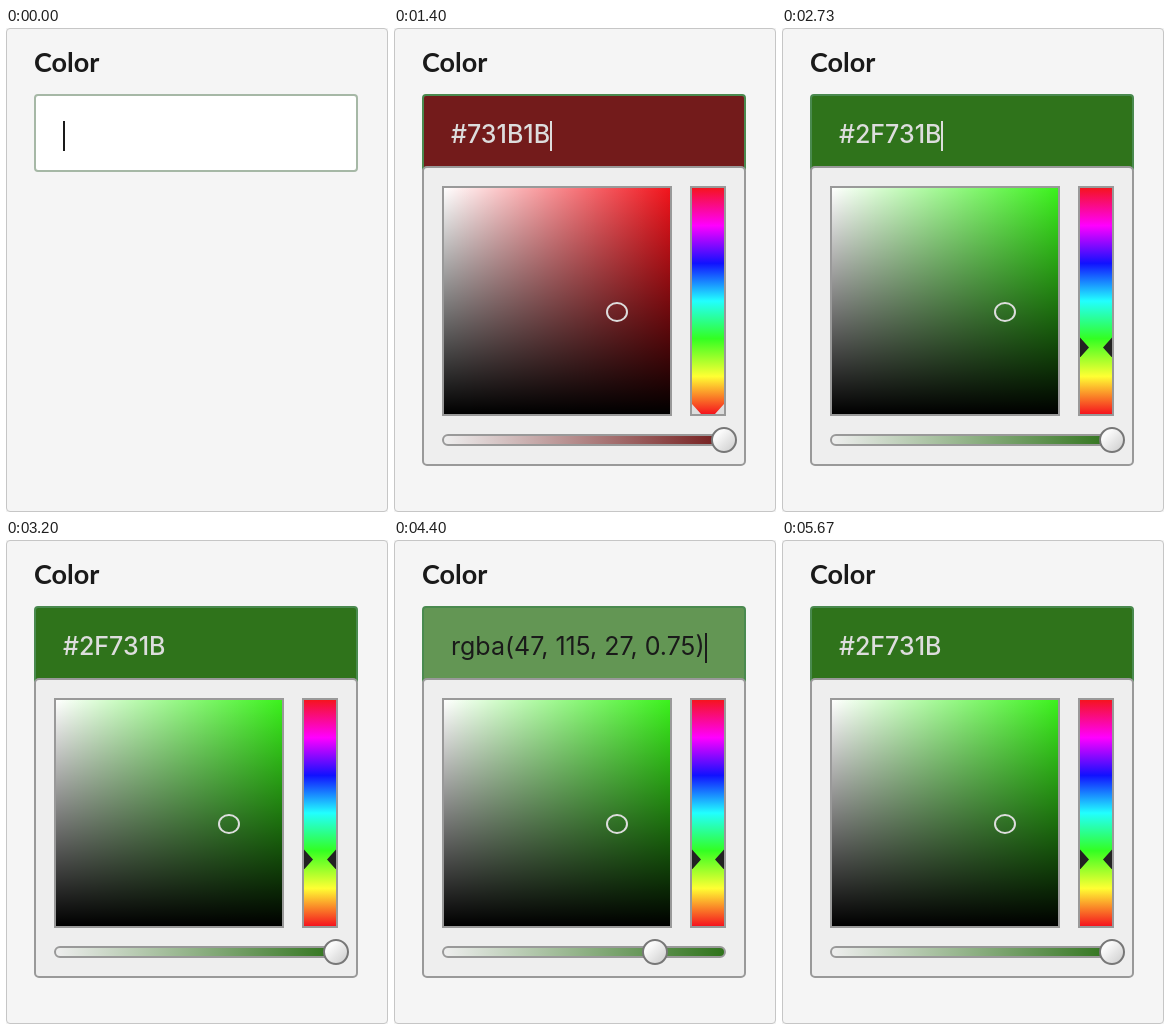
Recreate the animation shown at these times as an HTML page. Size 382 by 484 pixels, loop 5.74 s.

```html
<!DOCTYPE html>
<html lang="en">
<head>
<meta charset="utf-8">
<title>Color picker</title>
<style>
html, body { margin: 0; width: 100%; height: 100%; overflow: hidden; background: #f5f5f5; }
* { box-sizing: border-box; }
div { position: absolute; }
#stage { left: 0; top: 0; width: 382px; height: 484px; border: 1px solid #c6c6c6; border-radius: 4px; }
#stage > div { margin: -1px; }
#label { left: 28px; top: 17px; font: 700 27px/34px Lato, sans-serif; color: #1a1a1a; }
#field { left: 28px; top: 66px; width: 324px; height: 78px; border: 2px solid; border-radius: 4px; }
#value { left: 27px; top: 18px; width: 269px; height: 40px; overflow: hidden; white-space: pre; font: 400 25px/40px Inter, sans-serif; }
#caret { display: inline-block; width: 2px; height: 30px; background: currentColor; vertical-align: middle; }
#panel { left: 28px; top: 138px; width: 324px; height: 300px; background: #eee; border: 2px solid #999; border-radius: 5px; }
.box { top: 18px; height: 230px; border: 2px solid #999; overflow: hidden; }
#shade { left: 18px; width: 230px; }
#hue { left: 266px; width: 36px;
  background: linear-gradient(#f5141e, #f0f, #11f, #2ff, #3f2, #ff3, #f5141e); }
#ring { width: 22px; height: 20px; margin: -10px -11px; border: 2px solid; border-radius: 50%; }
#arrows { left: 0; width: 32px; height: 20px; margin-top: -10px;
  clip-path: polygon(0 0, 9px 50%, 0 100%, 100% 100%, 23px 50%, 100% 0, 100% 100%, 0 100%); }
#bar { left: 18px; top: 266px; width: 284px; height: 12px; border: 2px solid #999; border-radius: 6px; }
#knob { top: 259px; width: 26px; height: 26px; margin-left: -13px; border: 2px solid #777; border-radius: 50%;
  background: linear-gradient(135deg, #fafafa 25%, #ccc); }
</style>
</head>
<body>
<div id="stage">
  <div id="label">Color</div>
  <div id="field"><div id="value"><span id="text"></span><span id="caret"></span></div></div>
  <div id="panel">
    <div id="shade" class="box"><div id="ring"></div></div>
    <div id="hue" class="box"><div id="arrows"></div></div>
    <div id="bar"></div>
    <div id="knob"></div>
  </div>
</div>
<script>
const LOOP = 5740, SIZE = 226;
const $ = id => document.getElementById(id);
const clamp = x => Math.min(1, Math.max(0, x));
const ease = (t, a, b) => { const x = clamp((t - a) / (b - a)); return x * x * (3 - 2 * x); };
const css = c => `rgb(${c.join()})`;
const luma = ([r, g, b]) => .299 * r + .587 * g + .114 * b;
const hex = c => '#' + c.map(v => v.toString(16).padStart(2, '0')).join('').toUpperCase();

function hsv(h, s, v) {
  const part = n => {
    const k = (n + h / 60) % 6;
    return Math.round(255 * v * (1 - s * clamp(Math.min(k, 4 - k))));
  };
  return [part(5), part(3), part(1)];
}

const alphaKeys = [[3200, 1], [3670, .72], [4020, .52], [4400, .75], [4900, 1]];
function alphaAt(t) {
  const i = alphaKeys.findIndex(k => k[0] > t);
  if (i < 1) return 1;
  const [t0, a0] = alphaKeys[i - 1], [t1, a1] = alphaKeys[i];
  return Math.round(100 * (a0 + (a1 - a0) * (t - t0) / (t1 - t0))) / 100;
}

function draw(t) {
  const open = ease(t, 70, 300), drag = ease(t, 700, 1330);
  const s = .765 * drag, v = 1 - .55 * drag, h = 106 * ease(t, 1750, 2600);
  const alpha = alphaAt(t), color = hsv(h, s, v), pure = hsv(h, 1, 1);
  const shown = color.map(c => Math.round(255 + (c - 255) * alpha));
  const ink = luma(shown) < 120 ? '#ddd' : '#1a1a1a';

  $('panel').style.opacity = open;
  $('field').style.background = css(shown);
  $('field').style.borderColor = css([166 - 92 * open, 184 - 46 * open, 166 - 87 * open]);
  $('value').style.color = ink;
  $('value').style.fontWeight = ink === '#ddd' ? 500 : 400;
  $('text').textContent = t < 250 ? '' : alpha < 1 ? `rgba(${color.join(', ')}, ${alpha})` : hex(color);
  $('caret').style.opacity = +(t % 1100 < 550 && t < 5500);

  const tint = pure.map((c, i) => Math.round(c * .95 + [2, 20, 28][i] * (1 - c / 255)));
  $('shade').style.background =
    `linear-gradient(#0000, #000), linear-gradient(90deg, #fff, #fff0), ${css(tint)}`;
  $('ring').style.left = SIZE * s + 'px';
  $('ring').style.top = SIZE * (1 - v) + 'px';
  $('ring').style.borderColor = luma(color) < 120 ? '#ddd' : '#222';
  $('arrows').style.top = SIZE * (1 - h / 360) + 'px';
  $('arrows').style.background = luma(pure) < 120 ? '#ddd' : '#222';
  $('bar').style.background = `linear-gradient(90deg, #eee, ${css(color)})`;
  $('knob').style.left = 22 + 278 * alpha + 'px';
}

const start = performance.now();
function tick() {
  draw((performance.now() - start) % LOOP);
  requestAnimationFrame(tick);
}
tick();
</script>
</body>
</html>
```
